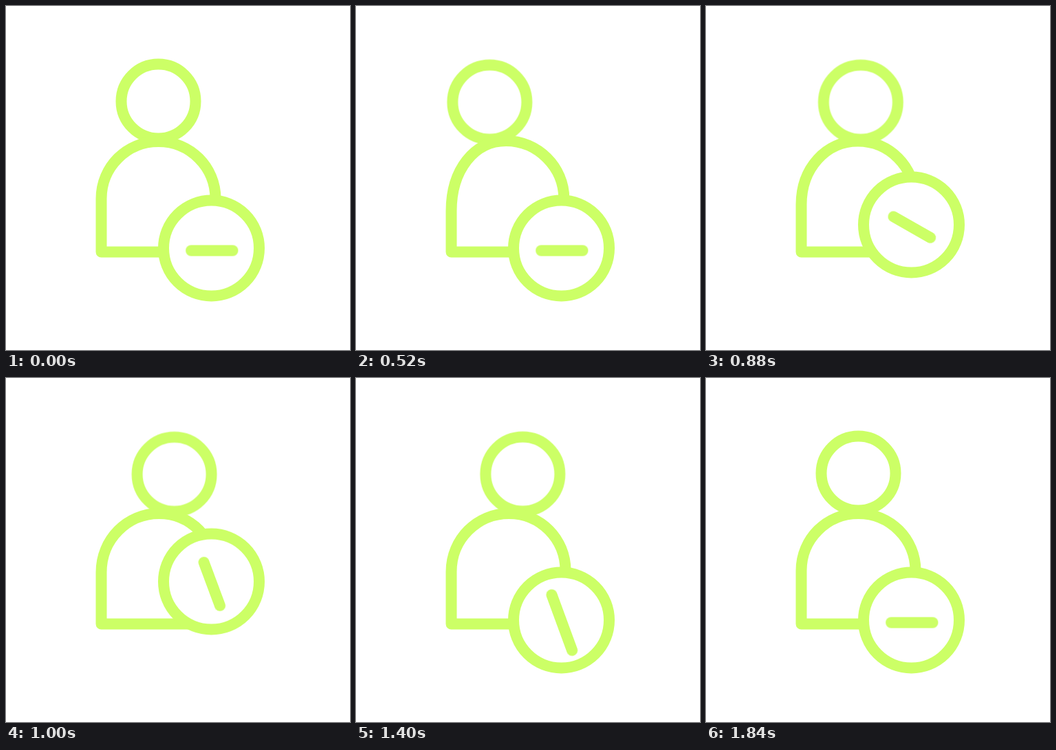
These frames come from a looping animation (500 by 500 pixels, 2 s). An HTML page without scripts:

```html
<!DOCTYPE html>
<html lang="en">
<head>
<meta charset="utf-8">
<title>Remove user</title>
<style>
  html, body { margin: 0; width: 100%; height: 100%; overflow: hidden; background: #fff; }
  svg { display: block; width: 100%; height: 100%; }

  .icon {
    --smooth: cubic-bezier(.333, 0, .667, 1);
    fill: none;
    stroke: #cf6;
    stroke-width: 16;
    stroke-linecap: round;
    stroke-linejoin: round;
  }
  .icon * { animation: 2s var(--smooth) infinite; }
  .icon .head { animation-name: sway; }
  .icon .body { animation-name: lean; }
  .icon .badge { animation-name: hop; }
  .icon .disc { fill: #fff; }
  .icon .bar { animation-name: spin, stretch; }

  @keyframes sway {
    0%, 8%, 80%, 100% { transform: translate(0, 0); }
    26%, 34% { transform: translate(-27.2px, 1.2px); }
    52%, 66.65% { transform: translate(24.8px, 1.4px); }
  }

  @keyframes lean {
    0%, 8%, 80%, 100% {
      d: path("M138.5 357.5V280C138.5 234 175.5 197 221.5 197S304.5 234 304.5 280V357.5Z");
    }
    26%, 34% {
      d: path("M138.5 357.5V298C138.5 238 172 196 218 196S302.3 234 302.3 280V357.5Z");
    }
    52%, 66.65% {
      d: path("M138.5 357.5V282C138.5 234 176.5 197 222.5 197S304.5 234 304.5 280V357.5Z");
    }
  }

  /* The second hop is cut off in mid-fall. */
  @keyframes hop {
    0%, 34%, 70%, 91.95%, 100% { transform: translateY(0); }
    52% { transform: translateY(-58px); }
    85.75% {
      transform: translateY(-38px);
      animation-timing-function: cubic-bezier(.333, 0, .667, .453);
    }
    91.9% { transform: translateY(-24.8px); }
  }

  @keyframes spin {
    0%, 34% { transform: rotate(0deg); }
    91%, 100% { transform: rotate(360deg); }
  }

  @keyframes stretch {
    0%, 40%, 90%, 100% { d: path("M-30.2 0H30.2"); }
    70% { d: path("M-43 0H43"); }
  }
</style>
</head>
<body>
<svg viewBox="0 0 500 500">
  <g class="icon">
    <circle class="head" cx="221.5" cy="138.5" r="54"/>
    <path class="body" d="M138.5 357.5V280C138.5 234 175.5 197 221.5 197S304.5 234 304.5 280V357.5Z"/>
    <g class="badge">
      <circle class="disc" cx="298.5" cy="352" r="69.5"/>
      <g transform="translate(299.3 355.5)">
        <path class="bar" d="M-30.2 0H30.2"/>
      </g>
    </g>
  </g>
</svg>
</body>
</html>
```
